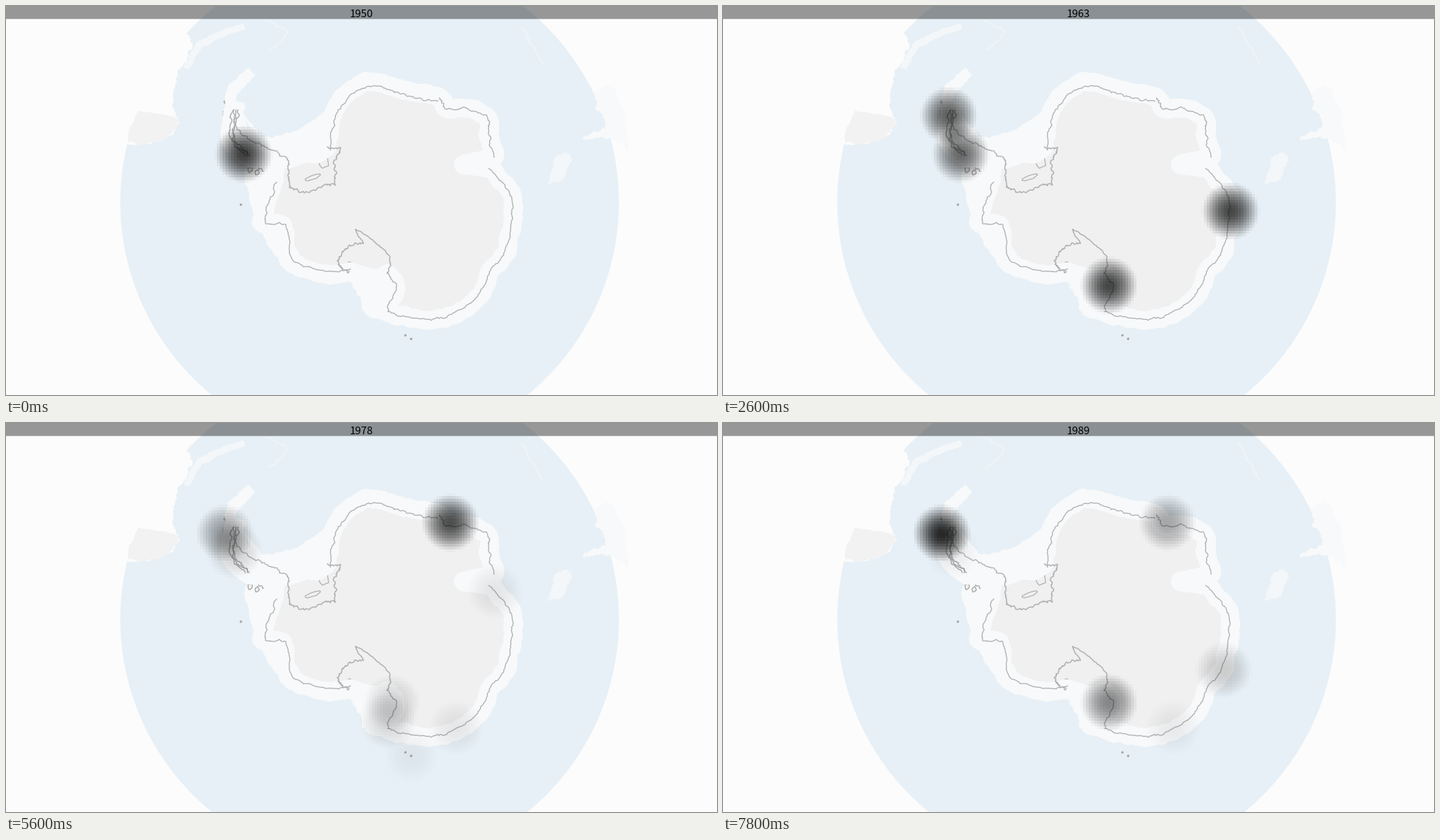
Animation, 1011 px wide and 554 px high, one loop 8000 ms. Source, as a matplotlib script:

```python
import matplotlib.pyplot as plt
import numpy as np
from matplotlib.animation import FuncAnimation
from matplotlib.patches import Circle, Polygon, Rectangle

W, H, DPI = 1011, 554, 100
FRAMES, STEP_MS, FIRST_YEAR = 40, 200, 1950
CELL, RADIUS = 4, 42
PAPER, OCEAN, SHELF = "#fcfcfc", "#e7f0f6", "#f7f9fa"
LAND, COAST = "#f0f0f0", "#b0b0b0"
POLE = np.array([540, 280])

rng = np.random.default_rng(12)

# Key points of the coast, in order around the continent.
PENINSULA = [(324, 148), (328, 176), (355, 196), (380, 205), (400, 219)]
RONNE = [(400, 219), (425, 210), (441, 211), (457, 201)]
NORTH = [(457, 201), (463, 158), (484, 126), (515, 108), (548, 114),
         (580, 123), (617, 130), (627, 146), (658, 146), (686, 160),
         (687, 180), (695, 215)]
AMERY = [(695, 215), (672, 221), (650, 226), (688, 231)]
EAST = [(688, 231), (717, 264), (722, 302), (709, 355), (691, 375),
        (672, 414), (632, 441), (595, 447), (543, 437), (555, 403),
        (542, 381)]
ROSS = [(542, 381), (526, 388), (488, 378)]
WEST = [(488, 378), (455, 381), (405, 365), (394, 312), (366, 311),
        (369, 282), (381, 250), (375, 222), (340, 213), (319, 188),
        (324, 148)]

# Grounding lines behind the two large ice shelves.
RONNE_BACK = [(400, 219), (404, 256), (424, 266), (452, 255), (467, 250),
              (466, 222), (475, 206), (457, 201)]
ROSS_EAST = [(542, 381), (546, 358), (522, 334), (497, 318), (508, 338)]
ROSS_WEST = [(508, 338), (486, 344), (474, 360), (476, 372), (488, 378)]

BAYS = [
    [(335, 150), (355, 184), (405, 180), (460, 150), (457, 201), (400, 219)],
    [(480, 382), (504, 415), (510, 438), (545, 445), (550, 385)],
    [(378, 225), (340, 235), (355, 305), (390, 366), (405, 365), (385, 300)]]
PATAGONIA = [(150, 198), (215, 193), (247, 168), (236, 140), (244, 100),
             (262, 62), (245, 40), (150, 100)]
PATAGONIA_LAND = [(188, 149), (238, 157), (245, 168), (222, 190), (174, 194)]
TASMAN = [(834, 122), (844, 150), (852, 172), (820, 190), (858, 188),
          (885, 200), (865, 118)]
PLATEAU = [(770, 252), (783, 214), (803, 214), (790, 248)]

SITES = {
    "shetland": (336, 102), "biscoe": (311, 157), "graham": (321, 156),
    "palmer": (325, 182), "adelaide": (338, 211), "enderby": (632, 142),
    "prydz": (695, 240), "davis": (722, 292), "casey": (712, 352),
    "ross": (549, 398), "adare": (543, 424), "adelie": (640, 434),
    "balleny": (576, 474)}
HEAT = {
    1950: {"adelaide": .75},
    1957: {"biscoe": .72, "shetland": .14, "palmer": .3, "adelaide": .26},
    1963: {"graham": .62, "adelaide": .58, "davis": .72, "ross": .72},
    1968: {"shetland": .36, "biscoe": .15, "adelaide": .72, "enderby": .2,
           "casey": .16, "ross": .27, "adare": .2},
    1973: {"enderby": .8, "balleny": .1},
    1982: {"biscoe": .66, "palmer": .28, "enderby": .6, "prydz": .14,
           "ross": .25, "adare": .25, "adelie": .13},
    1989: {"biscoe": .82, "palmer": .06, "enderby": .33, "casey": .18,
           "ross": .46, "adelie": .06}}


def smooth(points, n=3):
    """Catmull-Rom curve through the key points."""
    p = np.array(points, float)
    p = np.vstack([2 * p[0] - p[1], p, 2 * p[-1] - p[-2]])
    t = (np.arange(n) / n)[:, None]
    parts = [b + t / 2 * (c - a + t * (2 * a - 5 * b + 4 * c - d
                                       + t * (3 * (b - c) + d - a)))
             for a, b, c, d in zip(p, p[1:], p[2:], p[3:])]
    return np.vstack(parts + [p[-2:-1]])


def rough(points, amp=1.6, rounds=3):
    """Split each segment and push the midpoints sideways."""
    pts = smooth(points)
    for _ in range(rounds):
        step = np.diff(pts, axis=0)
        normal = step[:, ::-1] * (-1, 1)
        normal /= np.hypot(*step.T)[:, None] + 1e-6
        out = np.empty((2 * len(pts) - 1, 2))
        out[::2] = pts
        out[1::2] = (pts[:-1] + step / 2
                     + normal * rng.normal(0, amp, (len(step), 1)))
        pts, amp = out, amp * .55
    return pts


def inward(points, distance):
    p = np.array(points, float)
    ray = POLE - p
    return p + distance * ray / np.hypot(*ray.T)[:, None]


def area(points, color, amp=2.0):
    ax.add_patch(Polygon(rough(points + points[:1], amp), fc=color, lw=0))


def line(pts, width=1.5, color=COAST):
    ax.plot(*np.asarray(pts).T, color=color, lw=width * 72 / DPI,
            solid_joinstyle="round")


def islet(x, y, rx, ry, tilt=0, fill="#c4c4c4", edge="#a2a2a2"):
    t = np.linspace(0, 2 * np.pi, 12)[:-1]
    r = rng.uniform(.75, 1.2, t.size)
    z = (rx * r * np.cos(t) + 1j * ry * r * np.sin(t)) * np.exp(1j * tilt)
    ax.add_patch(Polygon(np.column_stack([x + z.real, y + z.imag]),
                         fc=fill, ec=edge, lw=.9))


def draw_sea():
    ax.add_patch(Circle((517, 279.5), 354.5, fc=OCEAN, lw=0))
    area(PATAGONIA, PAPER)
    area(PATAGONIA_LAND, "#f2f2f2", 1)
    area(TASMAN, SHELF)
    area(PLATEAU, "#f3f7f9")
    line(rough([(258, 85), (275, 56), (300, 42), (335, 30)]), 9, "#f3f7f9")
    line(rough([(370, 21), (400, 38), (375, 62)]), 2.5, "#eef4f8")
    line(rough([(733, 30), (764, 82)]), 2.5, "#eef4f8")


def draw_continent():
    sections = [(PENINSULA, 1.3), (RONNE, .4), (NORTH, 1.3), (AMERY, .7),
                (EAST, 1.3), (ROSS, .3), (WEST, 1.6)]
    outline = np.vstack([rough(pts, amp) for pts, amp in sections])
    line(outline, 26, SHELF)
    line(rough([(320, 148), (322, 120), (344, 98)]), 15, SHELF)
    for bay in BAYS:
        area(bay, SHELF, 1.5)
    ax.add_patch(Polygon(outline, fc=LAND, ec=COAST, lw=1.5 * 72 / DPI,
                         joinstyle="round"))
    for pts, amp in ((RONNE_BACK, 2), (ROSS_EAST, .7), (ROSS_WEST, 2)):
        line(rough(pts, amp))
    # A second line follows the coast just inland.
    for pts, depth in ((NORTH[:7], 6), (NORTH[6:], 1), (EAST, 1.5),
                       (WEST[:7], 4), (PENINSULA, 0)):
        line(rough(inward(pts, depth), 1.3), 1.3)
    for shift in (0, 3, 6):
        spine = np.array(WEST[-3:]) + (shift, 0)
        line(rough(spine, 1.8), 1.3, "#a4a4a4")
    islet(451, 220, 8, 12, fill=LAND, edge=COAST)
    islet(436, 244, 11, 3, -.3, LAND, COAST)
    islet(488, 369, 3, 5, fill=LAND, edge=COAST)


def draw_islands():
    islet(334, 102, 5, 1.8, -.6)
    islet(312, 136, 2, 3, .5)
    for y in range(151, 174, 4):
        islet(310, y, 1.5, 2.4)
    for x in range(347, 376, 5):
        islet(x, rng.uniform(221, 238), 3, 4, .3, LAND)
    for x, y in ((334, 283), (568, 469), (576, 474), (726, 290), (725, 329)):
        islet(x, y, 1.1, 1)


def heat_map(year):
    """Blend the weights of the surrounding survey years."""
    years = list(HEAT)
    total = np.zeros_like(gx)
    for name, (x, y) in SITES.items():
        weight = np.interp(year, years, [HEAT[k].get(name, 0) for k in years])
        dist2 = ((gx - x) ** 2 + (gy - y) ** 2) / RADIUS ** 2
        total += weight * np.clip(1 - dist2, 0, 1) ** 1.4
    return np.minimum(total, .88)


fig = plt.figure(figsize=(W / DPI, H / DPI), dpi=DPI, facecolor=PAPER)
ax = fig.add_axes([0, 0, 1, 1])
ax.axis("off")

draw_sea()
draw_continent()
draw_islands()

cols, rows = -(-W // CELL), -(-H // CELL)
gx, gy = np.meshgrid((np.arange(cols) + .5) * CELL,
                     (np.arange(rows) + .5) * CELL)
shade = np.zeros((rows, cols, 4))
heat = ax.imshow(shade, extent=(0, cols * CELL, rows * CELL, 0),
                 interpolation="nearest", aspect="auto", zorder=5)
ax.add_patch(Rectangle((0, 0), W, 18.5, fc="black", alpha=.4, lw=0,
                       snap=False, zorder=6))
label = ax.text(505.5, 15.5, "", ha="center", va="baseline", zorder=7,
                family="Noto Sans CJK JP", size=15 * 72 / DPI)
ax.set_xlim(0, W)
ax.set_ylim(H, 0)


def update(i):
    year = FIRST_YEAR + i
    shade[..., 3] = heat_map(year)
    heat.set_data(shade)
    label.set_text(str(year))
    return heat, label


anim = FuncAnimation(fig, update, frames=FRAMES, interval=STEP_MS,
                     repeat=True, repeat_delay=0)
plt.show()
```
